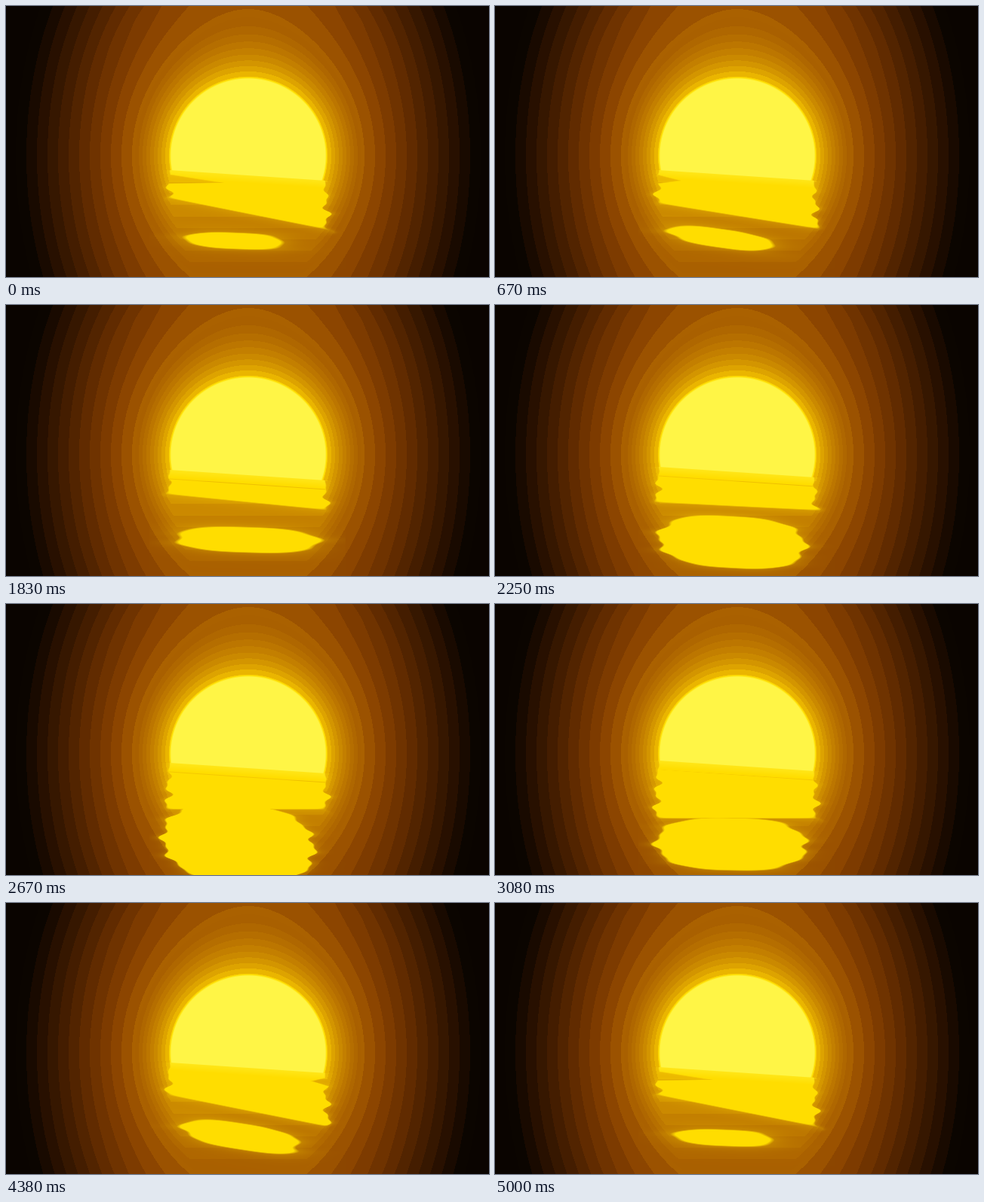
Recreate the animation shown at these times as an HTML page with a canvas. Size 640 px wide and 360 px high, loop 5.04 s.

```html
<!DOCTYPE html>
<html lang="en">
<head>
<meta charset="utf-8">
<title>Sun over water</title>
<style>
html, body { margin: 0; width: 100%; height: 100%; overflow: hidden; background: #000; }
canvas { display: block; width: 640px; height: 360px; }
</style>
</head>
<body>
<canvas id="stage" width="640" height="360"></canvas>
<script>
const W = 640, H = 360, LOOP = 5040;
const ctx = document.getElementById('stage').getContext('2d');
const SUN = { x: 321, y: 199, r: 104 };
const SUN_RGB = [255, 245, 70], RIM = [255, 224, 0];
const SHINE = [255, 221, 0], CREST = [255, 230, 24];
// moving part of the picture
const BOX = { x: 190, y: 200, w: 260, h: 160 };

const clamp = v => Math.max(0, Math.min(1, v));
const mix = (a, b, u) => a + (b - a) * u;
const mix3 = (a, b, u) => a.map((v, i) => mix(v, b[i], u));

// distance from the sun's centre; the glow stretches upright further out
function reach(x, y) {
  const dx = x - SUN.x, dy = y - SUN.y;
  const stretch = 0.3 * clamp((Math.hypot(dx, dy) - SUN.r) / 130);
  return Math.hypot(dx, dy * (1 - stretch));
}

// banded glow, yellow near the sun and reddish brown far away
function glow(r) {
  const step = r < 150 ? 5 : 14;
  const far = Math.max(0, (Math.floor(r / step) + 0.5) * step - SUN.r);
  const red = Math.max(10, 212 - 1.02 * far + 32 * Math.exp(-far / 15));
  return [red, red * (0.4 + 0.4 * Math.exp(-far / 50)), 0];
}

function skyAt(x, y) {
  const edge = SUN.r - Math.hypot(x - SUN.x, y - SUN.y);
  const rim = mix3(glow(reach(x, y)), RIM, clamp(edge / 2 + 0.8));
  return mix3(rim, SUN_RGB, clamp(edge / 2));
}

const waterAt = (x, y) => glow(Math.max(reach(x, y), SUN.r + (y - 216) * 0.33));

// level: waterline at the left; bottom, tilt: lower edge of the upper sheet;
// cut: wedge of dark water, from the right if negative;
// x, y, w, h, lean: the pool of light below
const poses = [
  { time: 0,    level: 218, bottom: 276, tilt: 0.20, cut: 68,  x: 304, y: 312, w: 65,  h: 11, lean: 0.04 },
  { time: 1250, level: 218, bottom: 281, tilt: 0.13, cut: 0,   x: 296, y: 306, w: 72,  h: 14, lean: 0.22 },
  { time: 1830, level: 219, bottom: 262, tilt: 0.10, cut: 0,   x: 320, y: 312, w: 95,  h: 17, lean: 0.03 },
  { time: 2670, level: 211, bottom: 273, tilt: 0,    cut: 0,   x: 308, y: 318, w: 100, h: 52, lean: 0.08 },
  { time: 3080, level: 208, bottom: 285, tilt: 0,    cut: 0,   x: 313, y: 319, w: 100, h: 35, lean: 0.02 },
  { time: 3880, level: 208, bottom: 276, tilt: 0.20, cut: -75, x: 317, y: 309, w: 86,  h: 22, lean: 0.23 }
];
poses.push({ ...poses[0], time: LOOP });

function poseAt(t) {
  const i = poses.findIndex(p => p.time > t);
  const a = poses[i - 1], b = poses[i];
  const u = (1 - Math.cos(Math.PI * (t - a.time) / (b.time - a.time))) / 2;
  const pose = {};
  for (const key in a) pose[key] = mix(a[key], b[key], u);
  return pose;
}

// upper sheet of light, positive inside
function sheet(p, x, y, depth, ripple) {
  const flare = depth * 0.06;
  const fromLeft = x - 215 + flare + ripple, fromRight = 425 + flare + ripple - x;
  const side = Math.min(fromLeft, fromRight);
  const above = p.bottom + p.tilt * (x - 320) + 2 - y;
  const body = side + above - Math.hypot(side, above) - 2;
  const inward = p.cut > 0 ? fromLeft : fromRight;
  const length = Math.abs(p.cut);
  const wedge = Math.min(6, length) * (1 - inward / (length + 0.1));
  return Math.min(body, Math.abs(depth - 12) - wedge);
}

// lower pool of light, positive inside
function pool(p, x, y, ripple) {
  const u = Math.abs(x - p.x) / (p.w + ripple);
  const v = (y - p.y - p.lean * (x - p.x)) / p.h;
  return (1 - Math.sqrt(u * u * u + v * v)) * p.h;
}

function paintSky() {
  const img = ctx.createImageData(W, H);
  for (let i = 0; i < W * H; i++) {
    img.data.set([...skyAt(i % W + 0.5, Math.floor(i / W) + 0.5), 255], i * 4);
  }
  ctx.putImageData(img, 0, 0);
}

const cells = Array.from({ length: BOX.w * BOX.h }, (_, i) => {
  const x = BOX.x + i % BOX.w + 0.5, y = BOX.y + Math.floor(i / BOX.w) + 0.5;
  return { x, y, sky: skyAt(x, y), water: waterAt(x, y), slope: 14 * clamp((x - 217) / 207) };
});
const view = ctx.createImageData(BOX.w, BOX.h);

function draw(t) {
  const p = poseAt(t), phase = 2 * Math.PI * t / LOOP;
  const px = view.data;

  cells.forEach(({ x, y, sky, water, slope }, i) => {
    const depth = y - p.level - slope;
    const side = x < SUN.x ? 0 : 2;
    const wave = Math.sin(y * 0.27 - phase * 4 + side) + 0.6 * Math.sin(y * 0.5 + phase * 3 + side);
    const ripple = wave * 4 * clamp(depth / 30);
    const d = Math.max(sheet(p, x, y, depth, ripple), pool(p, x, y, ripple));
    const light = Math.max(clamp(d / 2 + 0.5), 0.22 * Math.exp(Math.min(0, d) / 5));
    const crest = clamp(1 - depth / 10);
    const below = clamp(depth + 0.5);
    for (let c = 0; c < 3; c++) {
      const shine = mix(SHINE[c], CREST[c], crest);
      px[i * 4 + c] = mix(sky[c], mix(water[c], shine, light), below);
    }
    px[i * 4 + 3] = 255;
  });
  ctx.putImageData(view, BOX.x, BOX.y);
}

paintSky();
const start = performance.now();
function tick() {
  draw((performance.now() - start) % LOOP);
  requestAnimationFrame(tick);
}
tick();
</script>
</body>
</html>
```
